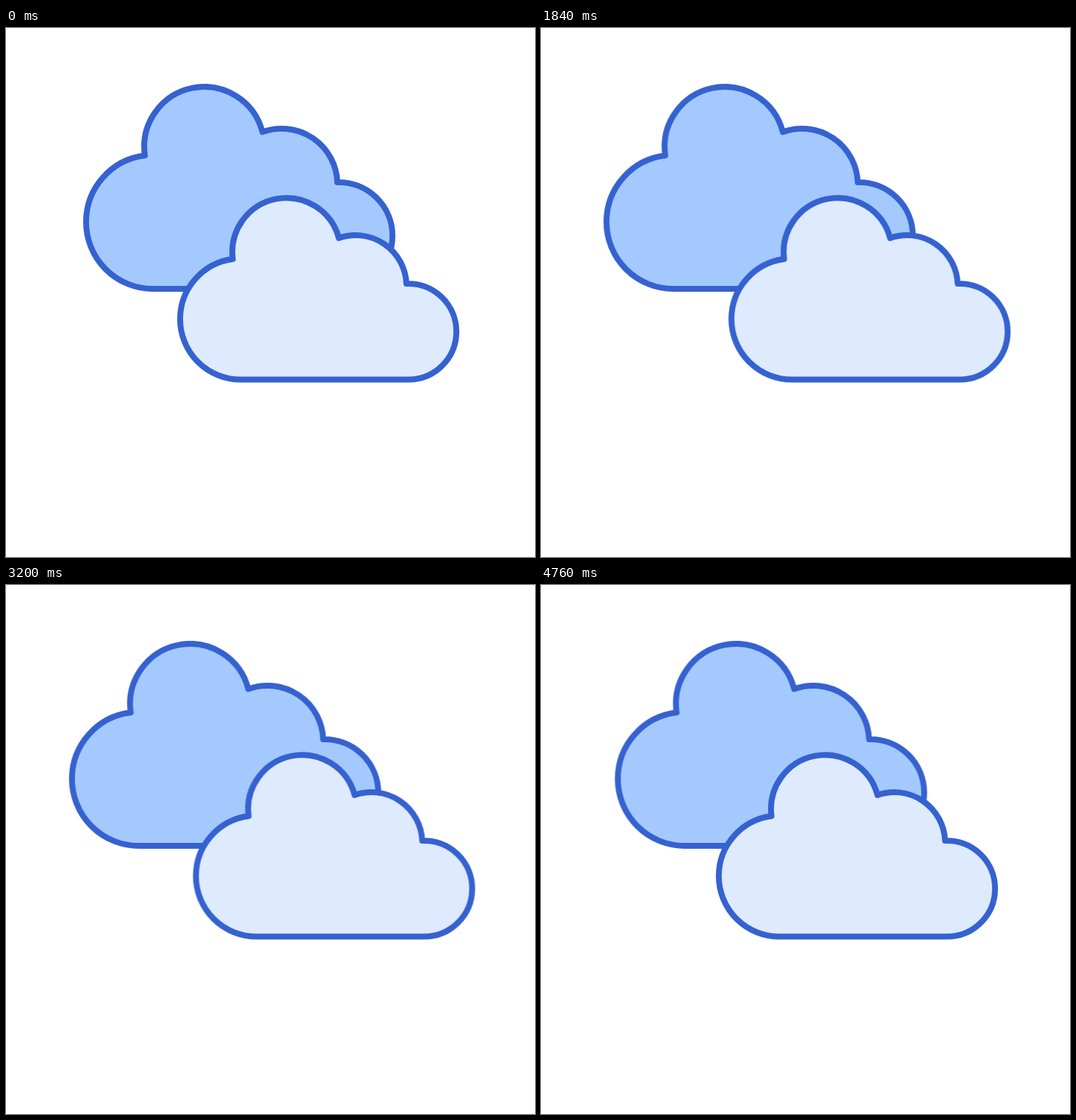
These frames come from a looping animation (720 by 720 pixels, 4.8 s). An HTML page:

```html
<!DOCTYPE html>
<html lang="en">
<head>
<meta charset="utf-8">
<title>Drifting clouds</title>
<style>
  html, body {
    margin: 0;
    width: 100%;
    height: 100%;
    overflow: hidden;
    background: #fff;
  }
  svg {
    display: block;
    width: 100%;
    height: 100%;
  }
  .cloud {
    stroke: #3562d0;
    stroke-width: 8;
    stroke-linejoin: round;
    animation: drift 4800ms infinite;
  }
  .back {
    --reach: -34.6px;
    fill: #a4c9ff;
  }
  .front {
    --reach: 38.5px;
    fill: #deeafe;
  }
  /* The loop cuts off the last swing shortly before it comes to rest. */
  @keyframes drift {
    0%, 0.42% {
      transform: translateX(0);
      animation-timing-function: cubic-bezier(.333, 0, .667, 1);
    }
    27.2% {
      transform: translateX(var(--reach));
      animation-timing-function: cubic-bezier(.333, 0, .667, 1);
    }
    52% {
      transform: translateX(0);
      animation-timing-function: cubic-bezier(.333, 0, .667, 1);
    }
    79.27% {
      transform: translateX(var(--reach));
      animation-timing-function: cubic-bezier(.333, 0, .667, .72);
    }
    100% {
      transform: translateX(calc(var(--reach) * .098));
    }
  }
</style>
</head>
<body>
<svg viewBox="0 0 720 720">
  <path class="cloud back" d="M200 355
    A91 91 0 0 1 109 264
    A91 91 0 0 1 189 173.5
    A81.7 81.7 0 0 1 349 141.5
    A76 76 0 0 1 451 210
    A73 73 0 0 1 526 282.5
    A72.5 72.5 0 0 1 453.5 355Z"/>
  <path class="cloud front" d="M319.3 478.5
    A82.3 82.3 0 0 1 237 396.2
    A82.3 82.3 0 0 1 308.7 314.5
    A73.7 73.7 0 0 1 453 286
    A69 69 0 0 1 545 348
    A65.3 65.3 0 0 1 613 413.2
    A65.3 65.3 0 0 1 547.7 478.5Z"/>
</svg>
</body>
</html>
```
